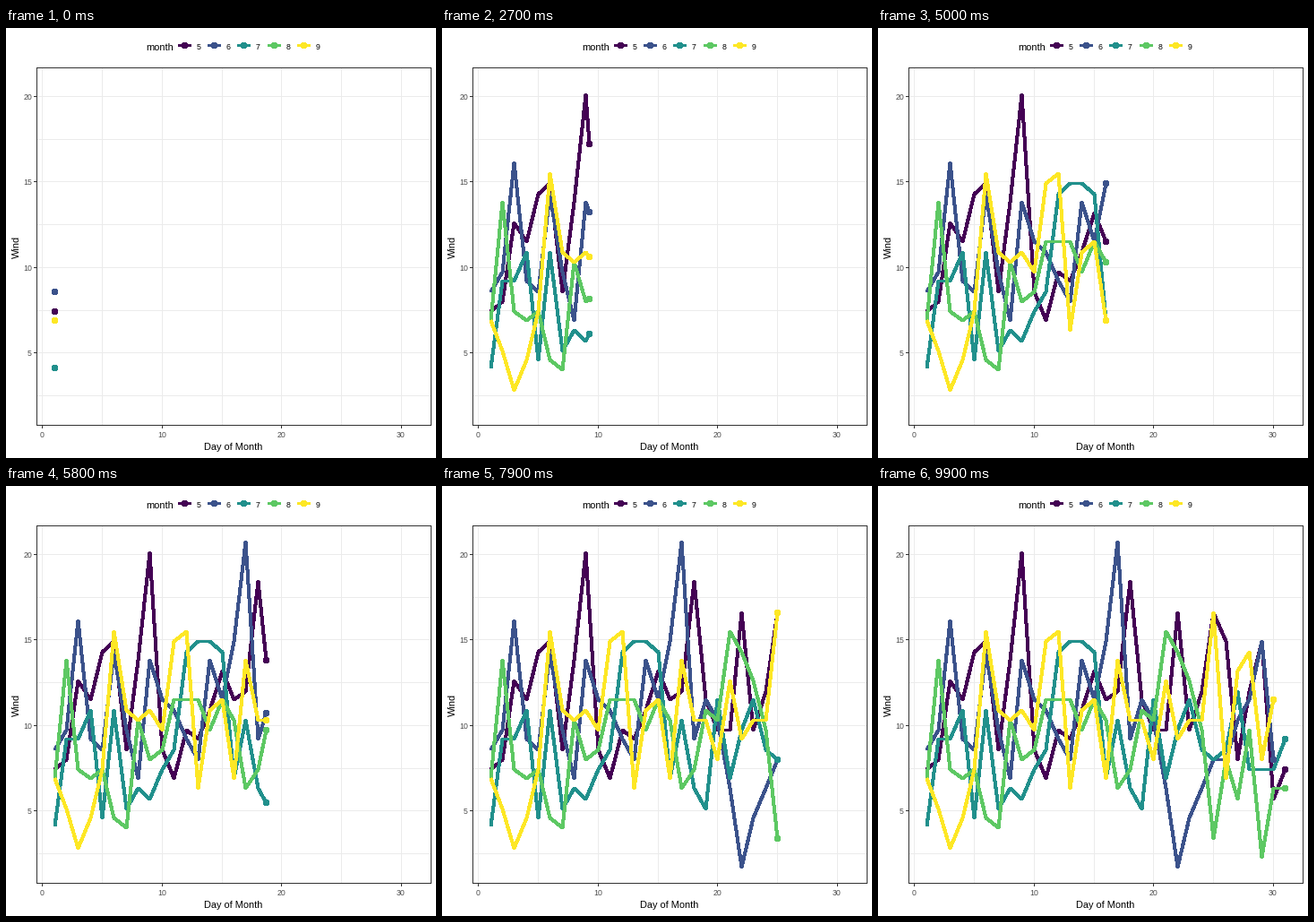
Animation, 480 px wide and 480 px high, one loop 10000 ms. Source, as a matplotlib script:

```python
import numpy as np
import matplotlib.pyplot as plt
from matplotlib.animation import FuncAnimation
from matplotlib.patches import Circle, Rectangle

SIZE, DPI, FRAMES = 480, 72, 100
GRID, EDGE, TICK_TEXT = "#EBEBEB", "#333333", "#4D4D4D"

plt.rcParams["font.family"] = "Liberation Sans"


# Data coordinates to the centre of a whole pixel
def px(day):
    return np.round(40.2 + 13.36 * np.asarray(day)) + 0.5


def py(wind):
    return np.round(457.77 - 19.1 * np.asarray(wind)) + 0.5


fig = plt.figure(figsize=(SIZE / DPI, SIZE / DPI), dpi=DPI, facecolor="white")
ax = fig.add_axes([0, 0, 1, 1])
ax.set_xlim(0, SIZE)
ax.set_ylim(SIZE, 0)
ax.axis("off")


def stroke(xs, ys, color, width=1, z=1):
    line, = ax.plot(xs, ys, color=color, lw=width, zorder=z, antialiased=False,
                    solid_capstyle="butt", solid_joinstyle="round", snap=False)
    return line


def dot(x, y, color, z=4):
    return ax.add_patch(Circle((x, y), 3.5, fc=color, lw=0, zorder=z,
                               antialiased=False, snap=False))


def label(x, y, text, size=8.8, color="black", **kw):
    ax.text(x, y, text, fontsize=size, color=color, va="baseline", **kw)


# Panel, grid and axes
left, right = px([-0.5, 32.5])
bottom, top = py([0.75, 21.65])

for day in range(0, 31, 5):
    stroke([px(day)] * 2, [top, bottom], GRID)
for wind in np.arange(2.5, 21, 2.5):
    stroke([left, right], [py(wind)] * 2, GRID)

for day in range(0, 31, 10):
    stroke([px(day)] * 2, [bottom, bottom + 3.5], EDGE)
    label(px(day) - 0.5, 457, str(day), color=TICK_TEXT, ha="center")
for wind in range(5, 21, 5):
    stroke([left - 3.5, left], [py(wind)] * 2, EDGE)
    label(29, py(wind) + 3.5, str(wind), color=TICK_TEXT, ha="right")

ax.add_patch(Rectangle((left, top), right - left, bottom - top, fill=False,
                       ec=EDGE, lw=1, zorder=5, antialiased=False, snap=False))
label(254, 471, "Day of Month", 11, ha="center")
label(15, 244, "Wind", 11, ha="center", rotation=90, rotation_mode="anchor")
label(156, 25, "month", 11)

# Daily wind speed of each month
may = [7.4, 8, 12.6, 11.5, 14.3, 14.9, 8.6, 13.8, 20.1, 8.6, 6.9, 9.7, 9.2,
       10.9, 13.2, 11.5, 12, 18.4, 11.5, 9.7, 9.7, 16.6, 9.7, 12, 16.6, 14.9,
       8, 12, 14.9, 5.7, 7.4]
june = [8.6, 9.7, 16.1, 9.2, 8.6, 14.3, 9.7, 6.9, 13.8, 11.5, 10.9, 9.2, 8,
        13.8, 11.5, 14.9, 20.7, 9.2, 11.5, 10.3, 6.3, 1.7, 4.6, 6.3, 8, 8,
        10.3, 11.5, 14.9, 8]
july = [4.1, 9.2, 9.2, 10.9, 4.6, 10.9, 5.1, 6.3, 5.7, 7.4, 8.6, 14.3, 14.9,
        14.9, 14.3, 6.9, 10.3, 6.3, 5.1, 11.5, 6.9, 9.7, 11.5, 8.6, 8, 8.6,
        12, 7.4, 7.4, 7.4, 9.2]
august = [6.9, 13.8, 7.4, 6.9, 7.4, 4.6, 4, 10.3, 8, 8.6, 11.5, 11.5, 11.5,
          9.7, 11.5, 10.3, 6.3, 7.4, 10.9, 10.3, 15.5, 14.3, 12.6, 9.7, 3.4,
          8, 5.7, 9.7, 2.3, 6.3, 6.3]
september = [6.9, 5.1, 2.8, 4.6, 7.4, 15.5, 10.9, 10.3, 10.9, 9.7, 14.9, 15.5,
             6.3, 10.9, 11.5, 6.9, 13.8, 10.3, 10.3, 8, 12.6, 9.2, 10.3, 10.3,
             16.6, 6.9, 13.2, 14.3, 8, 11.5]
months = [may, june, july, august, september]
colors = ["#440154", "#3B528B", "#21908C", "#5DC863", "#FDE725"]

lines, dots = [], []
for i, color in enumerate(colors):
    x = round(199 + 33.2 * i) + 0.5
    stroke([x - 7, x + 7], [19.5, 19.5], color, 3)
    dot(x, 19.5, color)
    label(x + 13.5, 24, str(5 + i))
    lines.append(stroke([], [], color, 3, z=2 + i / 10))
    dots.append(dot(0, 0, color, z=4 + i / 10))

# Every day starts on a whole frame; the pen moves linearly in between
days = np.arange(1, 32)
day_frames = np.round((days - 1) * (FRAMES - 1) / 30)


def update(frame):
    now = np.interp(frame, day_frames, days)
    for wind, line, tip in zip(months, lines, dots):
        own = days[:len(wind)]
        end = min(now, own[-1])
        past = own[own < end]
        x = px(np.append(past, end))
        y = py(np.append(wind[:len(past)], np.interp(end, own, wind)))
        line.set_data(x, y)
        line.set_visible(len(x) > 1)
        tip.center = x[-1], y[-1]
    return lines + dots


anim = FuncAnimation(fig, update, frames=FRAMES, interval=100,
                     repeat=True, repeat_delay=0, blit=False)
plt.show()
```
